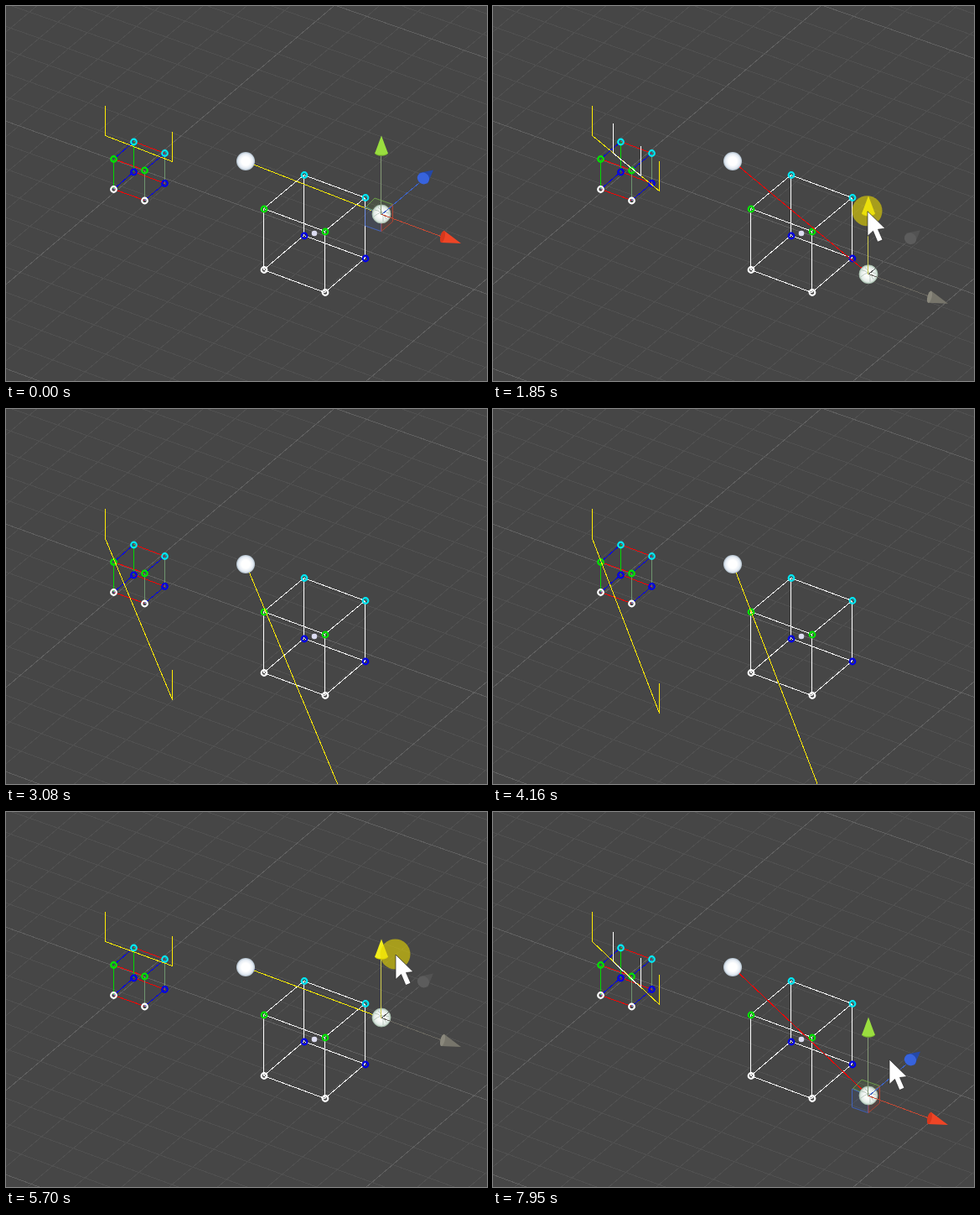
Animation, 574 px wide and 447 px high, one loop 8 s. Source, as an HTML page:

```html
<!DOCTYPE html>
<html lang="en">
<head>
<meta charset="utf-8">
<title>Segment and box test</title>
<style>
html, body { margin: 0; width: 100%; height: 100%; overflow: hidden; background: #464646; }
svg { display: block; width: 574px; height: 447px; }
</style>
</head>
<body>
<svg viewBox="0 0 574 447">
  <defs>
    <radialGradient id="ballA">
      <stop offset=".45" stop-color="#fff"/><stop offset=".8" stop-color="#e4ebf3"/><stop offset="1" stop-color="#aebdc9"/>
    </radialGradient>
    <radialGradient id="ballB">
      <stop offset=".4" stop-color="#fbfcfa"/><stop offset=".8" stop-color="#e2ebe6"/><stop offset="1" stop-color="#b2c6b8"/>
    </radialGradient>
  </defs>
  <g id="grid" shape-rendering="crispEdges"></g>
  <g id="boxes"></g>
  <g id="scene"></g>
</svg>
<script>
const LOOP = 8000, STEP = 77;           // the picture advances about 13 times a second
const START = { x: 286, y: 185 }, END_X = 448;
const LEFT = { x: 118, y: 154, w: 80, tick: 36 };
const PRESS = 18, RELEASE = 100;        // in steps
const YELLOW = '#ffeb04', RED = '#f00', WHITE = '#fff';

// [step, value] key points, linear in between
const BALL = [[17, 248], [31, 391.5], [39, 562], [47, 655], [50, 655], [54, 606], [71, 255], [74, 245], [83, 246], [92, 302.5], [97, 338]];
const DRAG_X = [[31, 447], [74, 465], [RELEASE, 467]];
const COME = { x: [[5, 490], [15, 451]], y: [[5, 378], [15, 172]] };
const LEAVE = { x: [[RELEASE, 467], [103, 473]], y: [[RELEASE, 263], [103, 295]] };

const $ = id => document.getElementById(id);

function track(keys, n) {
  if (n <= keys[0][0]) return keys[0][1];
  for (let k = 1; k < keys.length; k++) {
    const [n0, v0] = keys[k - 1], [n1, v1] = keys[k];
    if (n <= n1) return v0 + (v1 - v0) * (n - n0) / (n1 - n0);
  }
  return keys[keys.length - 1][1];
}

const crisp = v => Math.floor(v) + 0.5;
const line = (x1, y1, x2, y2, color) =>
  `<line x1="${crisp(x1)}" y1="${crisp(y1)}" x2="${crisp(x2)}" y2="${crisp(y2)}" stroke="${color}" shape-rendering="crispEdges"/>`;
const poly = (pts, x, y, attrs) =>
  `<polygon points="${pts.map(p => [x + p[0], y + p[1]]).join(' ')}" ${attrs}/>`;
const disc = (x, y, r, fill, extra = '') => `<circle cx="${x}" cy="${y}" r="${r}" fill="${fill}" ${extra}/>`;
const oval = (x, y, rx, ry, turn, fill) =>
  `<ellipse rx="${rx}" ry="${ry}" fill="${fill}" transform="translate(${x} ${y}) rotate(${turn})"/>`;

// Ground grid: both line families spread slightly towards the viewer
function drawGrid() {
  let minor = '', major = '';
  const add = (k, y, slope) => {
    const s = line(0, y, 574, y + 574 * slope, k % 10 ? '#505050' : '#606060');
    if (k % 10) minor += s; else major += s;
  };
  for (let k = -13; k <= 11; k++) add(k, 137 + 28.5 * k + 0.1 * k * k, 0.36 + 0.001 * k);
  for (let k = -8; k <= 13; k++) add(k, 331 + 45 * k + 0.3 * k * k, -0.847);
  $('grid').innerHTML = minor + major;
}

// Corners are indexed by bits: 1 = x, 2 = y, 4 = z
function box(ox, oy, ax, ay, az, edgeColor) {
  const corner = i => [
    ox + (i & 1 ? ax[0] : 0) + (i & 4 ? az[0] : 0),
    oy + (i & 1 ? ax[1] : 0) - (i & 2 ? ay : 0) + (i & 4 ? az[1] : 0)
  ];
  let s = '';
  for (const bit of [1, 2, 4]) {
    for (let i = 0; i < 8; i++) {
      if (!(i & bit)) s += line(...corner(i), ...corner(i | bit), edgeColor(bit, i));
    }
  }
  for (let k = 0; k < 8; k++) {
    const i = k ^ 4, [x, y] = corner(i);
    const c = i & 4 ? (i & 2 ? '#00e8f4' : '#0000e8') : (i & 2 ? '#00e400' : WHITE);
    s += disc(x + 0.5, y + 0.5, 3.3, 'none', `stroke="${c}" stroke-width="2.2"`);
    s += disc(x + 1.2, y - 0.2, 1, c, 'opacity=".5"');
  }
  return s;
}

function drawBoxes() {
  const axis = (bit, i) => bit === 1 ? RED : bit === 4 ? '#0000e6' : i & 1 ? '#6f946f' : '#00d800';
  $('boxes').innerHTML =
    box(128, 218, [37, 13.5], 36, [24, -20.5], axis) +
    box(307.5, 314, [73, 27], 72.5, [48, -40.5], () => WHITE) +
    disc(368, 271, 3.3, '#dcdcf0');
}

// Range of the segment inside the box, or null
function clip(y) {
  const drop = (y - 247) / 73;
  if (drop <= 0) return null;
  const a = Math.max(0.318, 0.24 / drop), b = Math.min(0.732, 1.25 / drop);
  return a < b ? [a, b] : null;
}

function graph(y, hit) {
  const h = (y - START.y) * 0.495;
  const at = p => [LEFT.x + LEFT.w * p, LEFT.y + h * p];
  const post = (p, c) => { const [x, py] = at(p); return line(x, py - LEFT.tick, x, py, c); };
  const span = (a, b, c) => line(...at(a), ...at(b), c) + post(a, c) + post(b, c);
  return span(0, 1, YELLOW) + (hit ? span(...hit, WHITE) : '');
}

const LOOKS = {
  idle: { x: '#ee4526', xBase: '#d8371c', xRod: '#c44a34', y: '#9ade3f', yBase: '#79b92e', yRod: '#869a76', z: '#3763dd', zTip: '#2448a8', zRod: '#3d63c4' },
  held: { x: '#77756b', xBase: '#8a887c', xRod: '#68665f', y: '#f2ee1c', yBase: '#d8d400', yRod: '#cfcb50', z: '#5c5c5c', zTip: '#525252', zRod: '#575757' }
};
LOOKS.hover = { ...LOOKS.idle, y: '#d9d596', yBase: '#b5b17a', yRod: '#b9b690' };

function gizmo(y, mode) {
  const x = END_X, c = LOOKS[mode];
  const quad = (pts, color) => poly(pts, x, y, `fill="${color}" fill-opacity=".1" stroke="${color}" stroke-opacity=".75"`);
  let s = '';
  if (mode !== 'held') {
    s += quad([[-18.5, -8.5], [-8, -19], [13.5, -11.5], [0, 0]], '#79b84a');
    s += quad([[-19.5, -8], [-19.5, 14], [-.5, 20.5], [-.5, 0]], '#3f68d8');
    s += quad([[0, 0], [13.5, -11.5], [13.5, 9], [0, 20.5]], '#c8442e');
  }
  s += disc(x, y, 11, 'url(#ballB)', 'stroke="#afc9b6" stroke-width=".7"');
  s += `<path transform="translate(${x} ${y})" d="M-9 3q9 -8 18 -4M-4 -8q7 5 6 17M-8 -5q8 1 14 11" fill="none" stroke="#93a99b" stroke-width=".8" opacity=".7"/>`;
  s += line(x, y, x + 45, y - 38, c.zRod);
  s += line(x, y, x + 73, y + 27, c.xRod);
  s += line(x - 0.5, y - 70, x - 0.5, y, c.yRod);
  s += poly([[62, -52.5], [45, -49], [55, -36]], x, y, `fill="${c.zTip}"`);
  s += oval(x + 50, y - 42.5, 7.4, 6.6, 35, c.z);
  s += poly([[95, 35], [74.5, 19.5], [71, 34]], x, y, `fill="${c.x}"`);
  s += oval(x + 73, y + 27, 2.6, 7.2, 14, c.xBase);
  s += oval(x, y - 72.5, 7.8, 3.2, 0, c.yBase);
  s += poly([[0, -93.5], [-7.8, -72.5], [-3, -70.5], [3, -70.5], [7.8, -72.5]], x, y, `fill="${c.y}"`);
  return s;
}

function pointer(x, y, held) {
  return (held ? disc(x - 0.5, y - 0.5, 18, '#e8d800', 'opacity=".6"') : '') +
    `<path transform="translate(${x} ${y})" d="M0 0V29.5L6.5 23.5L12 36.5L18 34L12.5 21.5L21 20.5Z" fill="#fff" stroke="#222" stroke-width=".7"/>`;
}

function draw(time) {
  const n = Math.floor(time / STEP + 0.25);
  const y = track(BALL, n), hit = clip(y);
  const held = n >= PRESS && n < RELEASE;
  const hover = (n >= PRESS - 4 && n < PRESS) || (n >= RELEASE && n < RELEASE + 2);
  let s = graph(y, hit);
  s += line(START.x, START.y, END_X, y, hit ? RED : YELLOW);
  s += disc(START.x, START.y, 11, 'url(#ballA)');
  s += gizmo(y, held ? 'held' : hover ? 'hover' : 'idle');
  if (held) s += pointer(track(DRAG_X, n), y - 75, true);
  else if (n >= COME.x[0][0]) {
    const path = n < PRESS ? COME : LEAVE;
    s += pointer(track(path.x, n), track(path.y, n), false);
  }
  $('scene').innerHTML = s;
}

drawGrid();
drawBoxes();
const begin = performance.now();
function tick() {
  draw((performance.now() - begin) % LOOP);
  requestAnimationFrame(tick);
}
tick();
</script>
</body>
</html>
```
